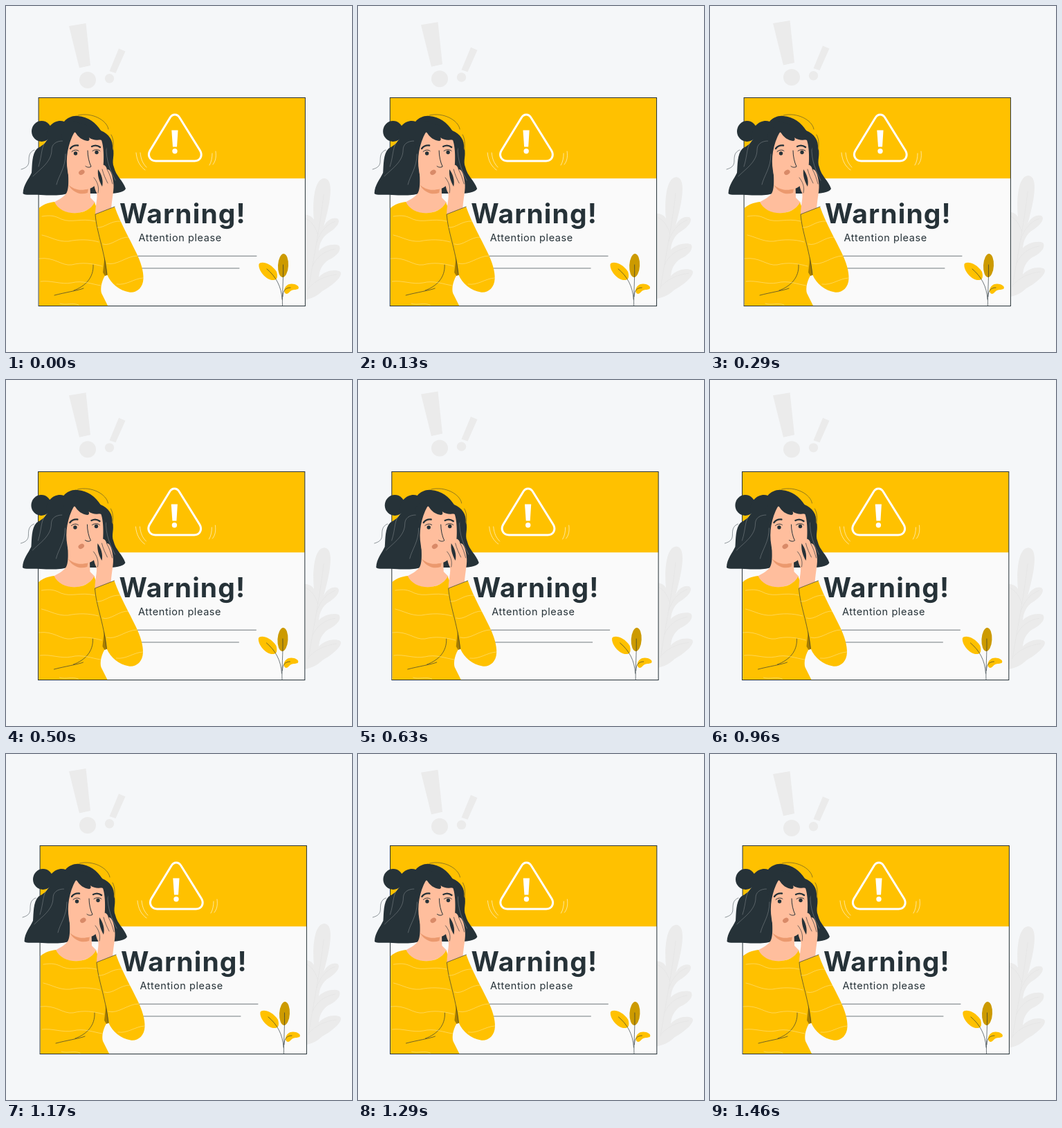
Animation, 500 px wide and 500 px high, one loop 1.5 s. Source, as an HTML page:

```html
<!DOCTYPE html>
<html lang="en">
<head>
<meta charset="utf-8">
<style>
  html, body { margin: 0; width: 100%; height: 100%; overflow: hidden; background: #f5f7f9; }
  svg { display: block; width: 100%; height: 100%; }
  text { font-family: Inter, sans-serif; fill: #263238; }
  .line { fill: none; stroke: #263238; stroke-width: .65; stroke-linecap: round; }
  .light { fill: none; stroke: #fff; stroke-width: .6; stroke-linecap: round; }
  .dark { fill: #263238; }
  .yellow { fill: #ffc100; }
  .skin { fill: #ffbe9d; }
</style>
</head>
<body>
<svg viewBox="0 0 500 500">
  <g id="floating" fill="#ebebeb">
    <path d="M91 29L115.500 25L122 86L106 89.500Z"/>
    <circle cx="118" cy="107" r="12"/>
    <path d="M163 61.500L172.500 65.500L158.500 97L149.500 94Z"/>
    <circle cx="149.500" cy="104.700" r="6.700"/>
    <path d="M420 304C432 299 441 302 445 309C443 288 444 250 460 249C474 250 470 280 459 319
      C464 308 473 305 479 307C485 312 476 322 466 328C458 333 453 342 452 354C459 346 474 343 481 346
      C486 352 478 362 466 367C457 373 453 381 452 392C461 382 476 380 483 384C488 390 472 404 457 412
      C449 420 440 424 420 427Z"/>
    <path fill="none" stroke="#e3e3e3" stroke-width=".6" d="M459 272C455 310 447 350 437 410M476 311C462 316 453 328 449 342
      M476 351C460 354 449 362 443 376M478 388C460 390 447 397 438 407M433 307C443 312 447 320 451 331"/>
  </g>

  <g id="shaking">
    <rect x="47.100" y="132.500" width="385.300" height="301" fill="#fafafa"/>
    <rect x="47.100" y="132.500" width="385.300" height="116.700" class="yellow"/>
    <rect x="47.100" y="132.500" width="385.300" height="301" class="line" style="stroke-width:1"/>

    <path class="light" style="stroke-width:3" d="M237 161.500C240.500 155.500 247.500 155.500 251 161.500L280.500 209
      C284.500 216 281 224 272.500 224H216.500C208 224 204 216 208 209Z"/>
    <path fill="#fff" d="M239.300 179.500H248.500L247 203.500H241Z"/>
    <circle cx="244" cy="209.800" r="3.700" fill="#fff"/>
    <path class="light" d="M194 212C195 222 198 228 203 233M188 212C189 224 194 232 201 237
      M298 213C298 219 297 225 294 230M303 210C304 218 303 224 299 229"/>

    <text x="164" y="314" font-size="39" font-weight="700" letter-spacing="1.100">Warning!</text>
    <text x="191.500" y="340" font-size="14.500" letter-spacing=".58">Attention please</text>
    <path class="line" d="M165 361.300H362M165 379H337"/>

    <g id="plant">
      <ellipse cx="400.500" cy="375" rx="7.500" ry="17" fill="#cc9a00" transform="rotate(3 400.500 375)"/>
      <path class="yellow" d="M365.500 373C368 368 383 371 391 384C393 391 392 396 387 396C376 397 364 382 365.500 373Z"/>
      <path class="yellow" d="M402 411C403 403 410 400 417 402C423 404 424 407 422 409C416 411 414 409 410 413C406 418 402 416 402 411Z"/>
      <path class="line" d="M399.500 433C399 418 401 395 400.500 374M377 380C390 391 398 405 399 424M400 420C400 411 404 407 411 407"/>
    </g>

    <g id="woman">
      <ellipse cx="51.500" cy="181" rx="14.500" ry="15" class="dark"/>
      <path class="dark" d="M63 174C70 166 78 165 84 167C89 161 97 158 104 159C119 160 130 169 137 180C149 185 155 194 154 206
        C158 214 152 224 156 233C159 246 169 252 173 264C170 271 150 272 130 271H88C80 274 66 274 50 273C36 272 28 274 24.500 271
        C25 258 33 250 37 241C38 230 37 214 45 206C52 202 56 199 59 194C58 186 59 179 63 174Z"/>
      <path class="line" style="stroke-width:.5" d="M41 208C33 211 33 218 33 224C33 231 29 234 22 236
        M104 158C124 153 146 165 148 178M152 186C157 195 154 202 155 210"/>
      <path class="light" stroke-opacity=".4" d="M82 195C72 195 66 200 66 208C66 225 50 235 39 246M60 193C50 201 53 214 47 232
        M86 214C86 234 76 245 73 258M145 203C144 224 152 240 158 252"/>

      <path class="skin" d="M89 230C90 244 92 264 87 271C81 278 75 280 69 284C78 304 116 305 129 284L122 277L121 240Z"/>
      <path fill="#eb996e" d="M90 258C97 265 108 268 119 264L118 270C107 274 96 269 90 258Z"/>
      <path class="skin" d="M99 182C110 190 130 190 138 194C142 205 142 230 139 242C135 259 122 266 112 265
        C98 264 91 254 89 238C86 220 89 200 99 182Z"/>
      <path class="dark" d="M84 205C87 193 94 186 100 182C104 190 111 194 118 195C121 195 121 192 120 190
        C126 195 136 194 140 192L144 208L150 196L136 179L98 166L80 186Z"/>
      <path class="line" style="stroke-width:2.400" d="M93 206C96 202 100 201 104 201.500M124 203C128 201 132 201 136 204"/>
      <path class="line" style="stroke-width:1" d="M95 210.500C98 207.500 103 207.500 105 209.500M125 209.500C128 207 134 207 136 209.500M118 209C118 217 120 226 123 232C120 234 117 233 115 231.500"/>
      <circle cx="100.500" cy="213" r="2.700" class="dark"/>
      <circle cx="131" cy="211.500" r="2.700" class="dark"/>
      <ellipse cx="109.300" cy="240.300" rx="4.500" ry="3.300" fill="#d98a68" transform="rotate(-30 109.300 240.300)"/>

      <path class="yellow" d="M70 283C79 304 117 305 128 284L150 340L146 385C138 396 136 408 138 415L147 433H47.800V292
        C53 287 61 284 70 283Z"/>
      <path fill="#a67d00" d="M143 358L149 388L143 390L140 385Z"/>
      <path class="skin" d="M129 302C129 287 133 277 131 270C127 263 126 251 127 248C129 244 133 246 134 250
        C133 242 132 237 134 235C136 233 138 235 139 237C138 231 140 229 142 230C144 231 145 233 146 236
        C151 235 154 245 155 254C157 265 153 276 152 295Z"/>
      <path class="dark" d="M133 236C132 244 134 252 139 261C141 252 138 243 133 236Z"/>
      <path class="line" d="M139 236C141 244 144 250 147 256M146 236C150 243 152 250 154 257M127 248C132 254 135 262 133 270"/>
      <path class="yellow" d="M129 301L157 290C166 315 178 335 188 356C195 370 199 384 198.500 394C198 408 188 415 178 413.500
        C164 411 152 402 146 388C144 355 131 330 129 301Z"/>
      <path class="line" d="M157 290L129 301C131 327 141 348 146 388M70 418C85 414 105 411 112 408M98 411C115 405 127 392 126 374"/>
      <path class="light" stroke-opacity=".55" d="M52 304C65 302 70 303 80 308C95 314 108 306 129 311
        M52 331C65 334 75 341 90 340C105 337 120 337 134 341M48 365C70 362 80 376 95 374C110 370 125 372 139 376
        M50 398C65 396 80 403 95 400C110 396 124 402 137 404M78 430C88 433 95 428 105 432
        M132 320C143 321 150 310 166 311M140 344C152 348 163 333 178 334M146 372C160 376 174 361 190 361M160 402C174 404 184 394 198 393"/>
    </g>
  </g>
</svg>
<script>
  const floating = document.getElementById('floating');
  const shaking = document.getElementById('shaking');
  const LOOP = 1500, STEPS = 36;
  const SHAKE = [0, -1, 2, -4, 4, -4, 4, -4, 2, -1, 0]; // px at every 10 %

  function shakeAt(progress) {
    const i = Math.min(Math.floor(progress * 10), 9);
    return SHAKE[i] + (SHAKE[i + 1] - SHAKE[i]) * (progress * 10 - i);
  }

  function draw(now) {
    // 24 steps per second; the small bias absorbs rounded step times
    const step = Math.floor((now % LOOP) / LOOP * STEPS + 0.1) % STEPS;
    const progress = step / (STEPS - 1);
    const lift = 10 * (1 - Math.abs(2 * progress - 1));
    floating.setAttribute('transform', `translate(0 ${-lift})`);
    shaking.setAttribute('transform', `translate(${shakeAt(progress)} 0)`);
  }

  const start = performance.now();
  (function tick() {
    draw(performance.now() - start);
    requestAnimationFrame(tick);
  })();
</script>
</body>
</html>
```
